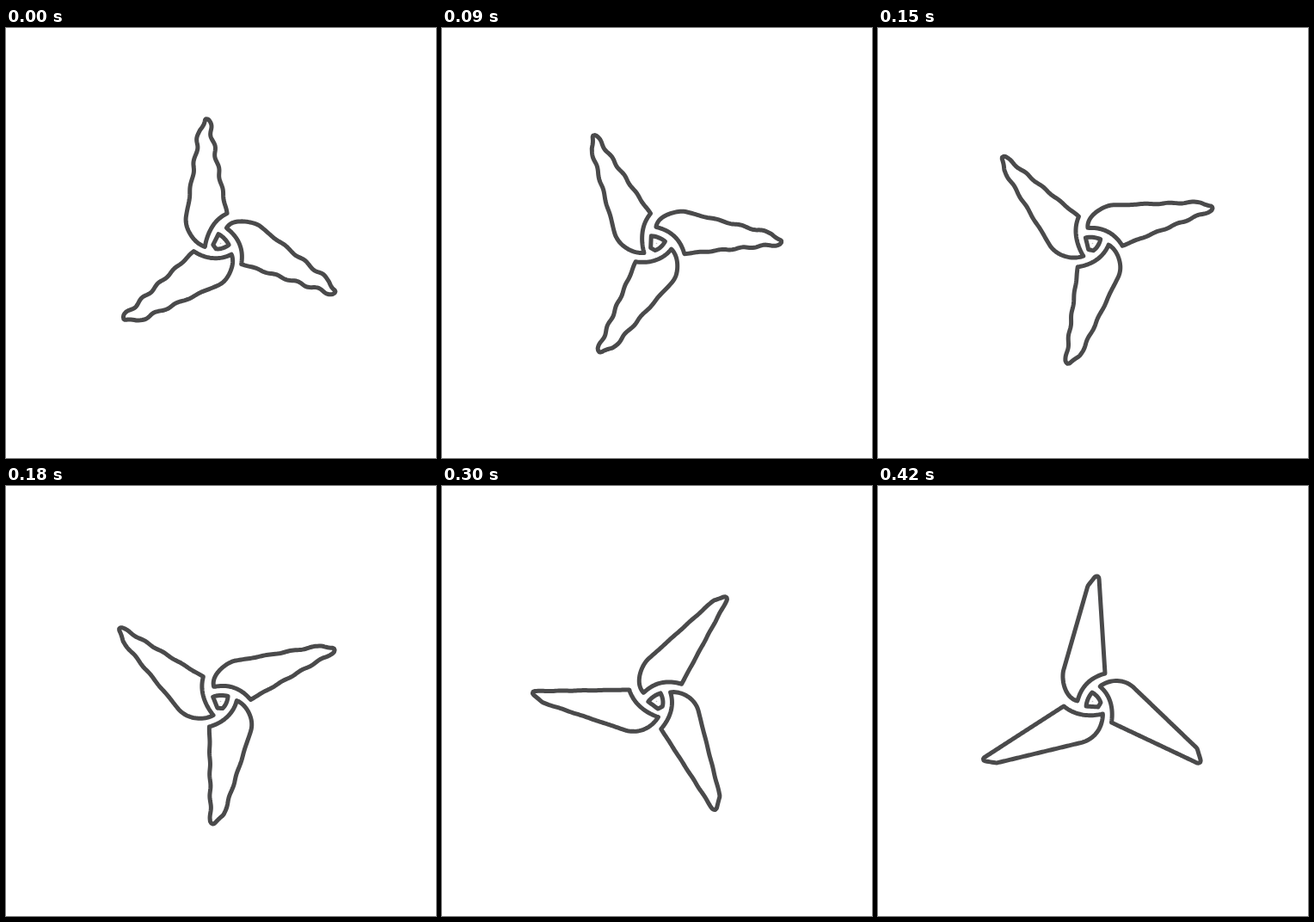
An HTML page with a canvas for the animation above (450 ms loop, 500 by 500 pixels).

```html
<!DOCTYPE html>
<html lang="en">
<head>
<meta charset="utf-8">
<title>Spinning propeller</title>
<style>
  html, body { margin: 0; height: 100%; overflow: hidden; background: #fff; }
  canvas { display: block; }
</style>
</head>
<body>
<canvas id="stage" width="500" height="500"></canvas>
<script>
const ctx = document.getElementById('stage').getContext('2d');
const CX = 250, CY = 249.5;
const STEPS = 15, STEP_MS = 30, STEP_ANGLE = 8 * Math.PI / 180;

const outlines = [
  'M264 218 L257 107 Q255 103 252 106 L244 116 L215.5 215 C213 229 219 247 232 250 C236 234 246 223 264 218Z',
  'M271.5 275 L371 322 Q376 323 375 318 L371 305 L298 235 C287 224 270 224 258 233 C270 243 274 258 271.5 275Z',
  'M216 256 L123 316 Q121 319 125 320 L138 322 L238 298 C253 293 261 281 261.5 265 C244 269 228 266 216 256Z',
  'M249 240 Q257 245 259 252 L256 257 L242 256 Q243 247 249 240Z'
].map(toPolar);

// Sample a path into polar points around the hub.
function toPolar(d) {
  const path = document.createElementNS('http://www.w3.org/2000/svg', 'path');
  path.setAttribute('d', d);
  const length = path.getTotalLength();
  const count = Math.round(length / 2);
  return Array.from({ length: count }, (_, i) => {
    const p = path.getPointAtLength(length * i / count);
    return { r: Math.hypot(p.x - CX, p.y - CY), a: Math.atan2(p.y - CY, p.x - CX) };
  });
}

function draw(now) {
  const left = STEPS - 1 - Math.floor(now % (STEPS * STEP_MS) / STEP_MS);
  const turn = left * STEP_ANGLE;
  // The hand-drawn waviness fades out towards the end of each loop.
  const wobble = 0.013 * (left / (STEPS - 1)) ** 1.5;

  ctx.filter = 'none';
  ctx.fillStyle = '#fff';
  ctx.fillRect(0, 0, 500, 500);
  ctx.filter = left ? 'blur(0.5px)' : 'none';
  ctx.strokeStyle = '#4a4a4b';
  ctx.lineWidth = 5;
  ctx.lineJoin = 'round';

  for (const points of outlines) {
    ctx.beginPath();
    for (const { r, a } of points) {
      const angle = a + turn + wobble * Math.cos((r - 112) / 4);
      ctx.lineTo(CX + r * Math.cos(angle), CY + r * Math.sin(angle));
    }
    ctx.closePath();
    ctx.stroke();
  }

  ctx.fillStyle = '#bbb';
  ctx.beginPath();
  ctx.arc(CX - 0.5, CY + 1, 0.8, 0, 2 * Math.PI);
  ctx.fill();
  requestAnimationFrame(draw);
}
draw(performance.now());
</script>
</body>
</html>
```
